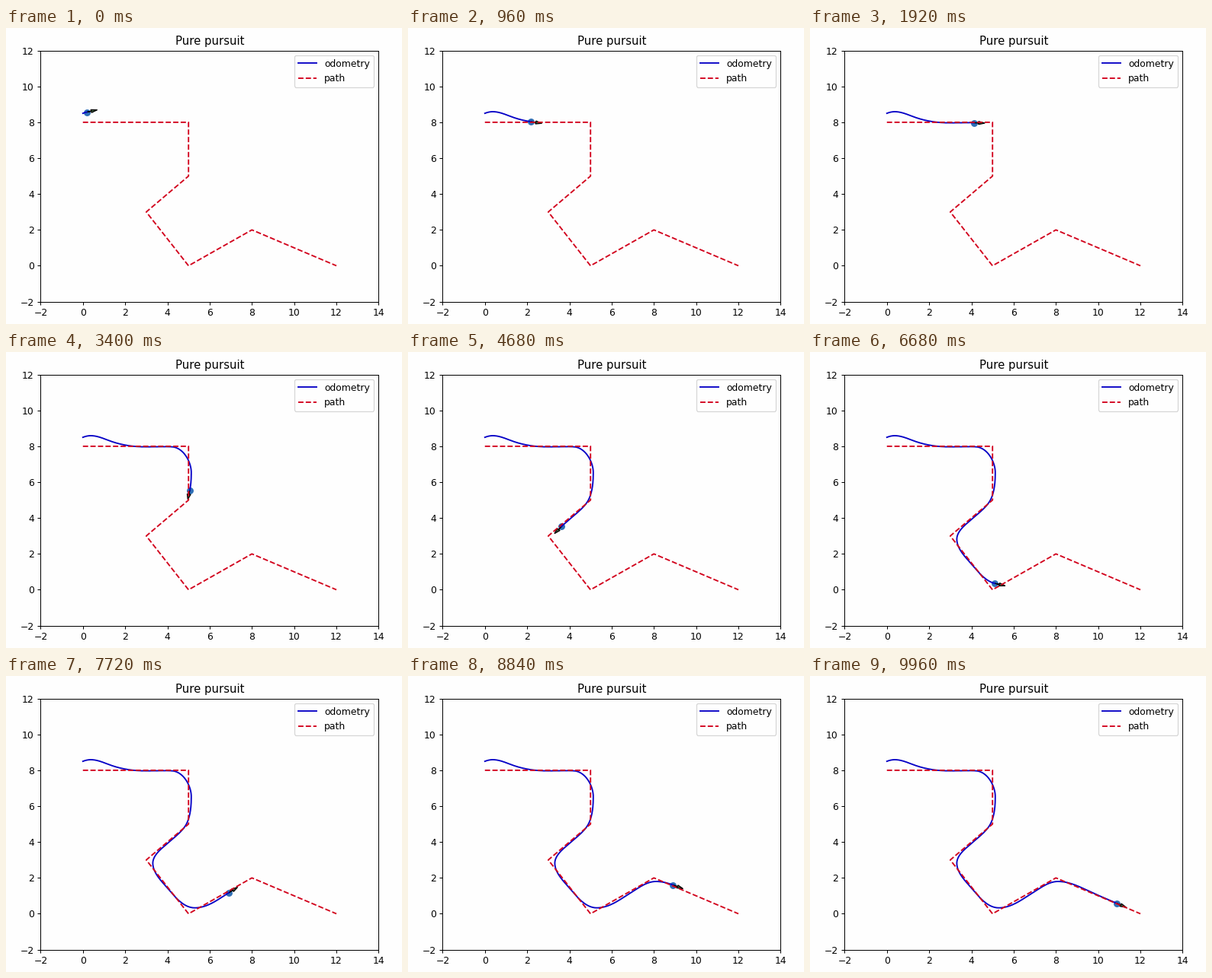
These frames come from a looping animation (519x389 px, 10000 ms). A matplotlib script:

```python
import numpy as np
import matplotlib.pyplot as plt
from matplotlib.animation import FuncAnimation

W, H = 519, 389
DPI = 72          # one point equals one pixel
K = 1.24          # scale of all default sizes
FRAMES, STEP = 250, 40

plt.rcParams.update({
    "font.family": "DejaVu Sans",
    "font.size": 10 * K,
    "axes.linewidth": 0.8 * K,
    "axes.titlepad": 6 * K,
    "lines.linewidth": 1.5 * K,
    "patch.linewidth": 1.0 * K,
})
for axis in ("xtick", "ytick"):
    plt.rcParams.update({
        f"{axis}.major.size": 3.5 * K,
        f"{axis}.major.width": 0.8 * K,
        f"{axis}.major.pad": 3.5 * K,
    })

PAPER, BLUE, RED = "#fefefe", "#0600c6", "#d2001c"

PATH = np.array([(0, 8), (5, 8), (5, 5), (3, 3), (5, 0), (8, 2), (12, 0)])

# Key poses of the vehicle: x, y, heading in degrees
POSES = [
    (0, 8.5, 25), (.37, 8.59, 0), (1.3, 8.29, -23), (2.6, 7.98, -4),
    (4.2, 7.97, -3), (5.13, 6.55, -90), (4.94, 5.1, -110),
    (4.08, 4, -134), (3.31, 2.82, -90), (4.08, 1.33, -54),
    (5.3, .33, 0), (6.93, 1.19, 36), (8.1, 1.8, 0), (9.9, 1.08, -27),
    (11.2, .42, -27),
]
START, SPEED = 0.19, 0.0788   # first distance, distance per frame
LEAD, SETTLE = 0.27, 15       # the vehicle starts a little faster


def bend(a, b, n=60):
    """Cubic Hermite curve from pose a to pose b."""
    p, q = np.array(a[:2]), np.array(b[:2])
    size = np.hypot(*(q - p))
    m, k = (size * np.array([np.cos(r), np.sin(r)])
            for r in np.radians([a[2], b[2]]))
    u = np.linspace(0, 1, n, endpoint=False)[:, None]
    return ((2 * u**3 - 3 * u**2 + 1) * p + (u**3 - 2 * u**2 + u) * m
            + (3 * u**2 - 2 * u**3) * q + (u**3 - u**2) * k)


CURVE = np.vstack([bend(a, b) for a, b in zip(POSES, POSES[1:])])
DIST = np.r_[0, np.cumsum(np.hypot(*np.diff(CURVE, axis=0).T))]


def along(s):
    """Position after the travelled distance s."""
    return np.array([np.interp(s, DIST, c) for c in CURVE.T])


def travelled(frame):
    return START + SPEED * frame + LEAD * (1 - np.exp(-frame / SETTLE))


fig = plt.figure(figsize=(W / DPI, H / DPI), dpi=DPI, facecolor=PAPER)
ax = fig.add_axes([45.4 / W, 29.4 / H, 443 / W, 330 / H], facecolor=PAPER)

trail, = ax.plot([], [], color=BLUE, label="odometry")
ax.plot(*PATH.T, "--", color=RED, label="path")
body, = ax.plot([], [], "o", color="#2f6fb6", ms=7.2 * K, mew=0, zorder=1)
arrow = ax.arrow(0, 0, 0.5, 0, head_width=0.17, head_length=0.3,
                 length_includes_head=True, fc="#3c5a3c", ec="black", zorder=1)
ax.set(xlim=(-2, 14), ylim=(-2, 12), title="Pure pursuit")
ax.legend(loc="upper right")


def draw(frame):
    s = travelled(frame)
    x, y = along(s)
    course = along(s + 0.1) - along(s - 0.1)
    dx, dy = 0.52 * course / np.hypot(*course)
    trail.set_data(*np.vstack([CURVE[DIST < s], (x, y)]).T)
    body.set_data([x], [y])
    arrow.set_data(x=x, y=y, dx=dx, dy=dy)
    return trail, body, arrow


anim = FuncAnimation(fig, draw, frames=FRAMES, interval=STEP,
                     repeat=True, repeat_delay=0)
plt.show()
```
